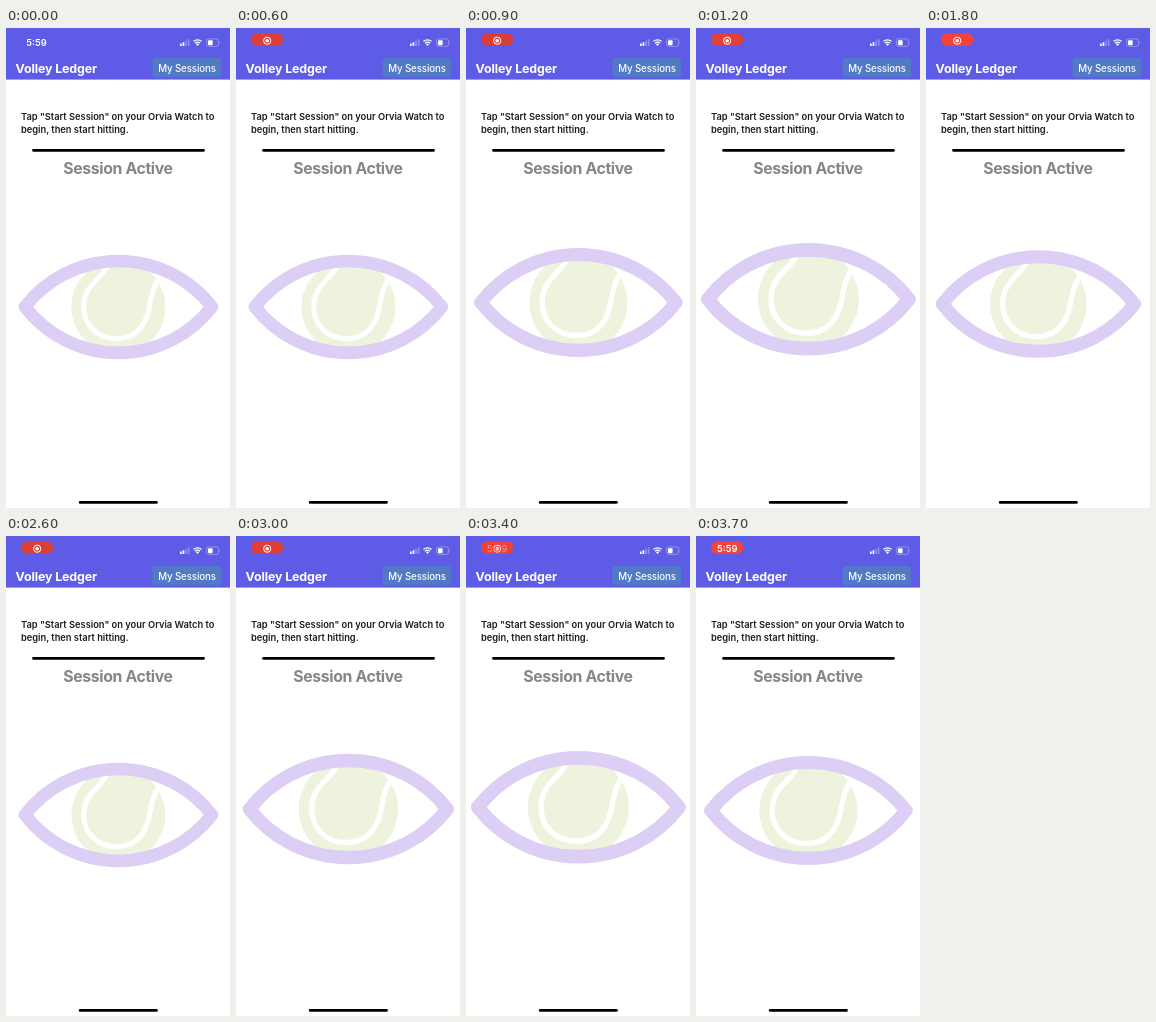
An HTML page for the animation above (3800 ms loop, 224x480 px).

```html
<!DOCTYPE html>
<html lang="en">
<head>
<meta charset="utf-8">
<title>Session screen</title>
<style>
  html, body { margin: 0; width: 100%; height: 100%; overflow: hidden; background: #fff; }
  svg { display: block; width: 100vw; height: 100vh; }
  text { font-family: Inter, "Open Sans", sans-serif; fill: #fff; }
  .clock { font-size: 9.4px; font-weight: 600; text-anchor: middle; }
  .title { font-size: 12.4px; font-weight: 700; letter-spacing: -.1px; }
  .button { font-size: 9.7px; font-weight: 500; letter-spacing: -.1px; text-anchor: middle; }
  .hint { font-size: 9.3px; font-weight: 600; fill: #1c1c1c; }
  .state { font-size: 15.8px; font-weight: 700; letter-spacing: -.36px; text-anchor: middle; fill: #868686; }
</style>
</head>
<body>
<svg viewBox="0 0 224 480">
  <rect width="224" height="51.6" fill="#5e5ce6"/>

  <!-- status bar -->
  <text id="plainClock" class="clock" x="30.5" y="18">5:59</text>
  <g id="pill">
    <rect id="pillBody" x="15" y="5.3" width="32.3" height="12.6" rx="6.3"/>
    <g id="record">
      <circle cx="31.2" cy="12.7" r="3.6" fill="none" stroke="#fff"/>
      <circle cx="31.2" cy="12.7" r="1.8" fill="#fff"/>
    </g>
    <text id="pillClock" class="clock" x="31.2" y="16">5:59</text>
  </g>
  <g fill="#fff">
    <path d="M174 15.5h1.7V18H174zM176.6 14.3h1.7V18h-1.7z"/>
    <path d="M179.2 12.7h1.7V18h-1.7zM181.8 11.2h1.7V18h-1.7z" opacity=".3"/>
    <path d="M191.5 18l-1.5-1.7a2.2 2.2 0 0 1 3 0z"/>
    <rect x="202" y="12.2" width="4.6" height="5" rx="1"/>
    <path d="M213.4 13.4v2.6q1-1.3 0-2.6z" opacity=".4"/>
  </g>
  <g fill="none" stroke="#fff">
    <path d="M187.4 13.4a6 6 0 0 1 8.2 0M189 15.3a3.7 3.7 0 0 1 5 0" stroke-width="1.3"/>
    <rect x="200.6" y="10.9" width="12" height="7.5" rx="2.2" stroke-width=".8" opacity=".4"/>
  </g>

  <!-- header and message -->
  <text class="title" x="9.5" y="44.6">Volley Ledger</text>
  <rect x="146.5" y="30" width="68.5" height="19.3" rx="3" fill="#5179c6"/>
  <text class="button" x="181" y="43.5">My Sessions</text>
  <text class="hint" x="15" y="92.3">Tap "Start Session" on your Orvia Watch to</text>
  <text class="hint" x="15" y="105">begin, then start hitting.</text>
  <rect x="26.2" y="120.9" width="172.6" height="2.8" rx="1.2" fill="#000"/>
  <text class="state" x="112" y="145.5">Session Active</text>

  <!-- pulsing eye with ball -->
  <g id="eye" fill="none" stroke-linecap="round" stroke-linejoin="round">
    <circle r="46" fill="#edf3dd"/>
    <path d="M-11-40C-16-28-33-22-34-2C-35 18-20 31-2 31C16 31 26 20 30 2C32-8 33-20 42-30"
          stroke="#fff" stroke-width="5"/>
    <path d="M-91.6 0A115.7 115.7 0 0 1 91.6 0A115.7 115.7 0 0 1-91.6 0Z"
          stroke="#dccef4" stroke-width="12.4"/>
  </g>

  <rect x="72.8" y="473.1" width="79" height="2.6" rx="1.3" fill="#000"/>
</svg>
<script>
  const LOOP = 3800, STEP = 100;
  const $ = id => document.getElementById(id);
  const ramp = (t, from, to) => Math.min(1, Math.max(0, (t - from) / (to - from)));
  const wave = (t, peak, period) => (1 + Math.cos((t - peak) / period * 2 * Math.PI)) / 2;
  const fade = (id, value) => $(id).setAttribute("opacity", value);

  function draw(t) {
    const p = wave(t, 1300, 2000);
    $("eye").setAttribute("transform", `translate(112.4 ${281 - 10 * p}) scale(${1 + p / 10})`);

    const shown = ramp(t, 0, 300), timed = ramp(t, 3300, 3600);
    fade("plainClock", 1 - shown);
    fade("pill", shown);
    fade("record", 1 - timed);
    fade("pillClock", timed);
    const glow = wave(t, 1800, 1900);
    $("pillBody").setAttribute("fill", `rgb(${216 + 30 * glow}, ${62 + 4 * glow}, 56)`);
  }

  const start = performance.now();
  function tick() {
    const t = (performance.now() - start) % LOOP;
    draw(Math.floor(t / STEP) * STEP);
    requestAnimationFrame(tick);
  }
  tick();
</script>
</body>
</html>
```
